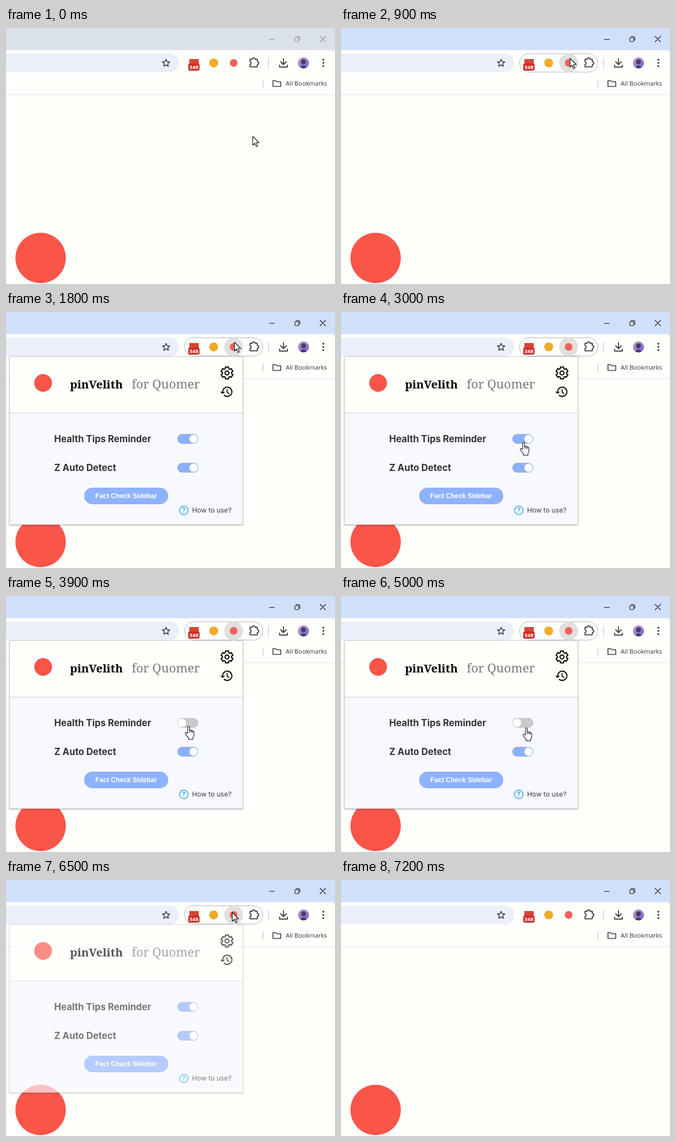
Write an HTML page that moves like this. It is 594 by 462 pixels and loops after 7.3 s.

```html
<!DOCTYPE html>
<html lang="en">
<head>
<meta charset="utf-8">
<title>Extension popup</title>
<style>
  html, body { margin: 0; width: 100%; height: 100%; overflow: hidden; background: #fffffc; }
  svg { display: block; width: 594px; height: 462px; }
  .line { fill: none; stroke-linejoin: round; stroke-linecap: round; }
  .label { font: 700 16.7px Inter, sans-serif; fill: #333; }
  .serif { font-family: "Noto Serif", serif; font-size: 22px; }
  .serif.bold { font-weight: 700; font-size: 20.5px; }
</style>
</head>
<body>
<svg viewBox="0 0 594 462">
  <defs>
    <linearGradient id="portrait" x2="1" y2="1">
      <stop stop-color="#b9a3d8"/><stop offset="1" stop-color="#7b5bc8"/>
    </linearGradient>
    <clipPath id="round"><circle cx="537" cy="63" r="10"/></clipPath>
    <filter id="shadow" x="-5%" y="-5%" width="110%" height="112%">
      <feDropShadow dx="0" dy="1" stdDeviation="1.6" flood-color="#000" flood-opacity=".32"/>
    </filter>
  </defs>

  <rect width="594" height="462" fill="#fffffc"/>
  <rect id="titleBar" width="594" height="48"/>
  <path d="M0 40H588Q594 40 594 46V121H0Z" fill="#fffffc"/>
  <g id="caption" class="line" stroke-width="1.1">
    <path d="M475.5 20.5H484.5M567 15L577 25M577 15L567 25"/>
    <rect x="521.5" y="17.5" width="7" height="7" rx="1.5"/>
    <path d="M523.5 15.5H528.5Q530.5 15.5 530.5 17.5V22.5"/>
  </g>

  <path d="M0 46H296A17 17 0 0 1 296 80H0Z" fill="#ebeff9"/>
  <path id="star" class="line" stroke="#3f4347" stroke-width="1.6"/>
  <rect id="pill" x="322.5" y="46.5" width="141" height="33" rx="16.5" fill="#fffffc" stroke="#b4b6ba"/>
  <circle id="hover" cx="411" cy="63" r="17" fill="#e0e0de"/>

  <rect x="331" y="56" width="17" height="17" fill="#dc4437"/>
  <rect x="329" y="64" width="20.5" height="13" rx="3" fill="#c6332c"/>
  <text x="339.2" y="74" text-anchor="middle" fill="#fff" style="font:700 9.5px 'Open Sans',sans-serif">348</text>
  <circle cx="375" cy="63" r="8" fill="#f2ab27"/>
  <circle cx="411" cy="63" r="7" fill="#f0635a"/>

  <g class="line" stroke="#3c4043" stroke-width="1.8">
    <path d="M440.5 56.5h4a2.6 2.6 0 0 1 5.2 0h4v4.2a2.6 2.6 0 0 1 0 5.2v4.2h-13.2v-4a2.8 2.8 0 0 0 0-5.4z"/>
    <path d="M501 55.5V65.5M496 61L501 66L506 61M494 67V70.5H508V67"/>
    <path d="M482 95H487L489 97H496V105.5H482Z" stroke-width="1.6"/>
  </g>
  <path d="M474 55V71M464 93V107" stroke="#c8dcf8" stroke-width="2"/>
  <g clip-path="url(#round)">
    <rect x="527" y="53" width="20" height="20" fill="url(#portrait)"/>
    <path d="M529 74Q537 61 545 74Z" fill="#4b3b66"/>
    <circle cx="537" cy="61" r="4.5" fill="#4b3b66"/>
  </g>
  <g fill="#3c4043"><circle cx="573" cy="57.3" r="1.7"/><circle cx="573" cy="63" r="1.7"/><circle cx="573" cy="68.7" r="1.7"/></g>
  <text x="505" y="104" fill="#30343a" style="font:11.2px 'Open Sans',sans-serif">All Bookmarks</text>
  <path d="M0 120.5H594" stroke="#dfe1e2"/>

  <circle cx="62.5" cy="415" r="45.5" fill="#f95549"/>

  <g id="popup">
    <rect x="6.5" y="80.5" width="421" height="303" fill="#f8f9ff" stroke="#d2d4d8" filter="url(#shadow)"/>
    <rect x="7" y="81" width="420" height="101" fill="#fffffc"/>
    <path d="M7 182.5H427" stroke="#c6c8cc"/>
    <circle cx="67" cy="128" r="16" fill="#f95549"/>
    <text class="serif bold" x="115.5" y="137.5">pinVelith</text>
    <text class="serif" x="227" y="137.5" fill="#77797d">for Quomer</text>
    <g class="line" stroke="#111" stroke-width="2.2">
      <path id="gear"/><circle cx="399" cy="110" r="3.6"/>
    </g>
    <g transform="translate(385.8 131.4) scale(1.05)" fill="#111">
      <path d="M13 3a9 9 0 0 0-9 9H1l3.9 3.9L9 12H6a7 7 0 1 1 2.05 4.95l-1.42 1.42A9 9 0 1 0 13 3z"/>
      <path d="M12.8 8V12.8L16 14.9" class="line" stroke="#111" stroke-width="1.7"/>
    </g>
    <g id="content">
      <text class="label" x="87" y="235">Health Tips Reminder</text>
      <text class="label" x="87" y="287">Z Auto Detect</text>
      <g id="tips"><rect x="309.5" y="220.5" width="37.5" height="17" rx="8.5" stroke="#000" stroke-opacity=".1"/><circle cy="229" r="7.6" fill="#fffffc"/></g>
      <g id="detect"><rect x="309.5" y="272.5" width="37.5" height="17" rx="8.5" stroke="#000" stroke-opacity=".1"/><circle cy="281" r="7.6" fill="#fffffc"/></g>
      <rect x="141" y="317" width="152" height="30" rx="15" fill="#8fb2fd"/>
      <text x="217" y="336" text-anchor="middle" fill="#fff" style="font:700 12px 'Liberation Sans',Arial,sans-serif">Fact Check Sidebar</text>
      <circle cx="321" cy="358" r="7.7" fill="none" stroke="#3da5ee" stroke-width="1.6"/>
      <text x="321" y="362.2" text-anchor="middle" fill="#3da5ee" style="font:700 11.5px Inter,sans-serif">?</text>
      <text x="336" y="362" fill="#3c3c3c" style="font:12.2px Inter,sans-serif">How to use?</text>
    </g>
  </g>

  <g id="cursor" fill="#fff" stroke="#111" stroke-width="1.1" stroke-linejoin="round">
    <path id="arrow" d="M.5 .5V16.5L4.2 13L6.8 19L9.3 18L6.7 12H11.8Z"/>
    <path id="hand" d="M5 13V2.3Q5 .5 6.7 .5T8.4 2.3V8Q10 6.5 11.2 8.4Q13 7.4 13.8 9.3Q16.3 8.7 16.3 11.5V16Q16.3 19 14.5 21V24H6.5V21.5Q3.5 18.5 .8 14.3Q.2 12.2 2 11.8Q3.4 11.8 5 13.8M8.4 8V12M11.2 8.5V12M13.8 9.5V12.5"/>
  </g>
</svg>
<script>
const LOOP = 7300, STEP = 100;
const el = id => document.getElementById(id);
const clamp = v => Math.min(1, Math.max(0, v));
const ramp = (t, from, to) => clamp((t - from) / (to - from));
const smooth = p => p * p * (3 - 2 * p);
const mix = (a, b, p) => a + (b - a) * p;
const set = (id, attrs) => { for (const k in attrs) el(id).setAttribute(k, attrs[k]); };
const show = (id, on) => set(id, { visibility: on ? 'visible' : 'hidden' });

// Closed outline through polar points: radius and angle in degrees.
const polar = (cx, cy, points) => 'M' + points.map(([r, deg]) => {
  const a = deg * Math.PI / 180;
  return `${(cx + r * Math.cos(a)).toFixed(2)} ${(cy + r * Math.sin(a)).toFixed(2)}`;
}).join('L') + 'Z';

set('star', { d: polar(289, 63.5, Array.from({ length: 10 }, (_, i) => [i % 2 ? 3.2 : 7, i * 36 - 90])) });
const tooth = [[8.3, -23], [11, -15], [11, 15], [8.3, 23]];
set('gear', { d: polar(399, 110, Array.from({ length: 6 }, (_, i) =>
  tooth.map(([r, a]) => [r, a + i * 60 - 90])).flat()) });

// Pointer stops: time, x, y
const route = [
  [0, 445, 195], [100, 445, 195], [800, 413, 54], [1600, 413, 54], [1800, 412, 54],
  [2200, 323, 234.5], [3900, 323, 234.5], [4100, 328, 237.5], [5700, 328, 237.5],
  [6300, 408, 58], [6600, 408, 58], [7100, 445, 195]
];

function pointerAt(t) {
  const i = route.findIndex(stop => stop[0] > t);
  if (i < 0) return route.at(-1).slice(1);
  const [t0, x0, y0] = route[i - 1], [t1, x1, y1] = route[i];
  const p = smooth(ramp(t, t0, t1));
  return [mix(x0, x1, p), mix(y0, y1, p)];
}

function drawSwitch(id, on) {
  const [track, knob] = el(id).children;
  const rgb = [[201, 140], [201, 176], [201, 252]].map(([a, b]) => Math.round(mix(a, b, on)));
  track.setAttribute('fill', `rgb(${rgb})`);
  knob.setAttribute('cx', mix(317.7, 338.6, on));
}

function draw(t) {
  const focused = t >= 900;
  set('titleBar', { fill: focused ? '#d0e0fb' : '#dbe1e8' });
  set('caption', { stroke: focused ? '#111' : '#8b9096' });
  show('pill', t >= 700 && t < 6800);
  show('hover', t >= 700 && t < 6800);

  const opacity = ramp(t, 1100, 1500) * (1 - ramp(t, 6400, 6700));
  const lift = -4 * (1 - ramp(t, 1100, 1500));
  set('popup', { opacity, transform: `translate(0 ${lift})` });
  set('content', { opacity: ramp(t, 1150, 1580) });

  const loaded = smooth(ramp(t, 1500, 1750));
  const switchedOff = smooth(ramp(t, 3000, 3400)) - smooth(ramp(t, 5500, 5900));
  drawSwitch('tips', loaded - switchedOff);
  drawSwitch('detect', loaded);

  const [x, y] = pointerAt(t);
  const overSwitch = t >= 2100 && t < 5900;
  set('cursor', { transform: `translate(${x} ${y})`, display: t < 7100 ? 'inline' : 'none' });
  show('arrow', !overSwitch);
  show('hand', overSwitch);
}

const start = performance.now();
function tick() {
  const t = (performance.now() - start) % LOOP;
  draw(Math.floor(t / STEP) * STEP);
  requestAnimationFrame(tick);
}
draw(0);
requestAnimationFrame(tick);
</script>
</body>
</html>
```
